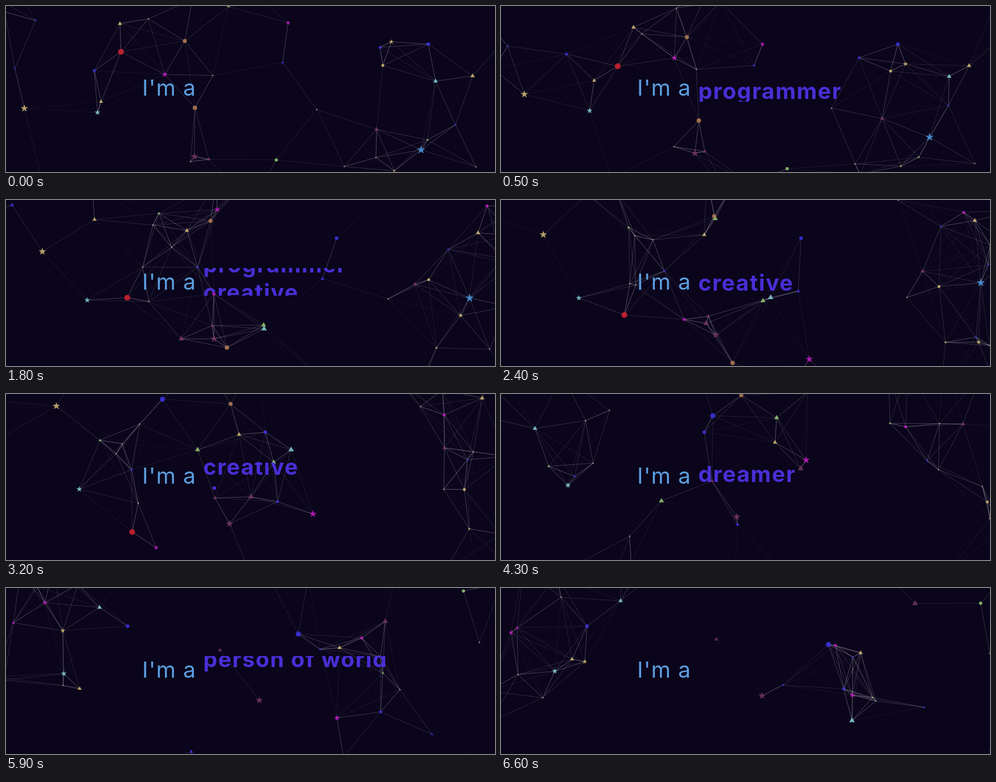
An HTML page with a canvas for the animation above (6700 ms loop, 880 px wide and 300 px high).

```html
<!DOCTYPE html>
<html lang="en">
<head>
<meta charset="utf-8">
<title>I'm a …</title>
<style>
  html, body { margin: 0; width: 100%; height: 100%; overflow: hidden; background: #0a051b; }
  canvas, svg { position: absolute; left: 0; top: 0; width: 880px; height: 300px; }
  text { font: 400 40px Montserrat, Inter, sans-serif; letter-spacing: .03em; fill: #5c9fe0; }
  #words text { font-weight: 700; letter-spacing: .04em; fill: #4a2ed6; }
</style>
</head>
<body>
<canvas id="sky" width="880" height="300"></canvas>
<svg viewBox="0 0 880 300">
  <clipPath id="slot"><rect x="340" y="123" width="540" height="50"/></clipPath>
  <text x="245" y="162">I'm a</text>
  <g clip-path="url(#slot)"><g id="words"></g></g>
</svg>
<script>
const LOOP = 6700, STEP = 100;
const REACH = 150, COUNT = 40, MAX_SPEED = 95;
const FIELD = { left: -60, top: -80, width: 1000, height: 460 };
const GOLD = '#d3bb76', ORANGE = '#b27c52', PLUM = '#763663', BLUE = '#3d33e0', SKY = '#4a98de',
      CYAN = '#86cfda', GREEN = '#93c96e', RED = '#d4222e', PINK = '#c41cc6', PALE = '#b5ad9c';
const COLORS = [GOLD, ORANGE, PLUM, BLUE, SKY, CYAN, GREEN, RED, PINK, GOLD];
const ctx = document.getElementById('sky').getContext('2d');

function seeded(seed) {
  return () => {
    seed = seed + 0x6D2B79F5 | 0;
    let n = Math.imul(seed ^ seed >>> 15, 1 | seed);
    n = n + Math.imul(n ^ n >>> 7, 61 | n) ^ n;
    return ((n ^ n >>> 14) >>> 0) / 2 ** 32;
  };
}

const random = seeded(21);
const between = (a, b) => a + (b - a) * random();
const pick = list => list[Math.floor(random() * list.length)];
const wrap = (value, start, size) => start + ((value - start) % size + size) % size;

// Leading particles cross the stage once; the others drift and wrap around the field.
const lead = (shape, color, r, x, y, vx, vy) => ({ shape, color, r, x, y, vx, vy });
const particles = [
  lead('triangle', PLUM, 4, 365, 277, 3.4, -27.9),
  lead('star', PLUM, 7, 339, 272, 19.8, -11.7),
  lead('triangle', GOLD, 4.5, 205, 32, 67, 12.9),
  lead('circle', BLUE, 3.3, 760, 69, -91.7, 0),
  lead('star', GOLD, 7, 33, 185, 18, -51),
  lead('circle', ORANGE, 4, 340, 184, 32, 46),
  lead('star', SKY, 8, 747, 260, 48.5, -46),
  lead('star', PINK, 7, 562, 500, -3, -88.5),
  lead('circle', BLUE, 4.7, -8, -78, 90.5, 27.3),
  lead('triangle', GREEN, 5.3, 508, -168, -51, 84),
];
for (let i = 0; i < COUNT; i++) {
  const speck = i % 4 === 0;
  particles.push({
    drifts: true,
    shape: speck ? 'circle' : pick(['star', 'star', 'circle', 'triangle']),
    color: speck ? PALE : pick(COLORS),
    r: speck ? 1.2 : between(2.5, 6),
    x: FIELD.left + random() * FIELD.width,
    y: FIELD.top + random() * FIELD.height,
    vx: between(-MAX_SPEED, MAX_SPEED),
    vy: between(-MAX_SPEED, MAX_SPEED),
  });
}

function position(p, t) {
  const x = p.x + p.vx * t, y = p.y + p.vy * t;
  return p.drifts
    ? { x: wrap(x, FIELD.left, FIELD.width), y: wrap(y, FIELD.top, FIELD.height) }
    : { x, y };
}

function drawShape({ shape, color, r }, { x, y }) {
  ctx.fillStyle = color;
  ctx.beginPath();
  if (shape === 'circle') ctx.arc(x, y, r, 0, 2 * Math.PI);
  else {
    const star = shape === 'star', corners = star ? 10 : 3;
    for (let i = 0; i < corners; i++) {
      const angle = 2 * Math.PI * i / corners - Math.PI / 2;
      const d = star && i % 2 ? r * .4 : r;
      ctx.lineTo(x + d * Math.cos(angle), y + d * Math.sin(angle));
    }
  }
  ctx.fill();
}

function drawNetwork(t) {
  const spots = particles.map(p => position(p, t));
  ctx.clearRect(0, 0, 880, 300);
  ctx.globalAlpha = 1;
  spots.forEach((a, i) => {
    for (const b of spots.slice(0, i)) {
      const d = Math.hypot(a.x - b.x, a.y - b.y);
      if (d >= REACH) continue;
      ctx.strokeStyle = `rgba(235,225,235,${.5 * (1 - d / REACH)})`;
      ctx.beginPath();
      ctx.moveTo(a.x, a.y);
      ctx.lineTo(b.x, b.y);
      ctx.stroke();
    }
  });
  ctx.globalAlpha = .85;
  particles.forEach((p, i) => drawShape(p, spots[i]));
}

const LINE = 50, BASELINE = 162;
const words = document.getElementById('words');
['programmer', 'creative', 'dreamer', 'person of world'].forEach((word, i) => {
  const text = document.createElementNS('http://www.w3.org/2000/svg', 'text');
  text.setAttribute('x', 355);
  text.setAttribute('y', BASELINE + LINE * i);
  text.textContent = word;
  words.append(text);
});

// The list eases by one line between these seconds, starting one line below the slot.
const stops = [0, .65, 2.65, 4.1, 5.45, 6.5];
function scrollAt(t) {
  const next = stops.findIndex(s => s > t);
  if (next < 0) return LINE * 4;
  const k = (t - stops[next - 1]) / (stops[next] - stops[next - 1]);
  return LINE * (next - 2 + (1 - Math.cos(Math.PI * k)) / 2);
}

const start = performance.now();
function render() {
  const elapsed = (performance.now() - start) % LOOP;
  const t = Math.floor(elapsed / STEP) * STEP / 1000;
  drawNetwork(t);
  words.setAttribute('transform', `translate(0 ${-scrollAt(t)})`);
  requestAnimationFrame(render);
}
render();
</script>
</body>
</html>
```
